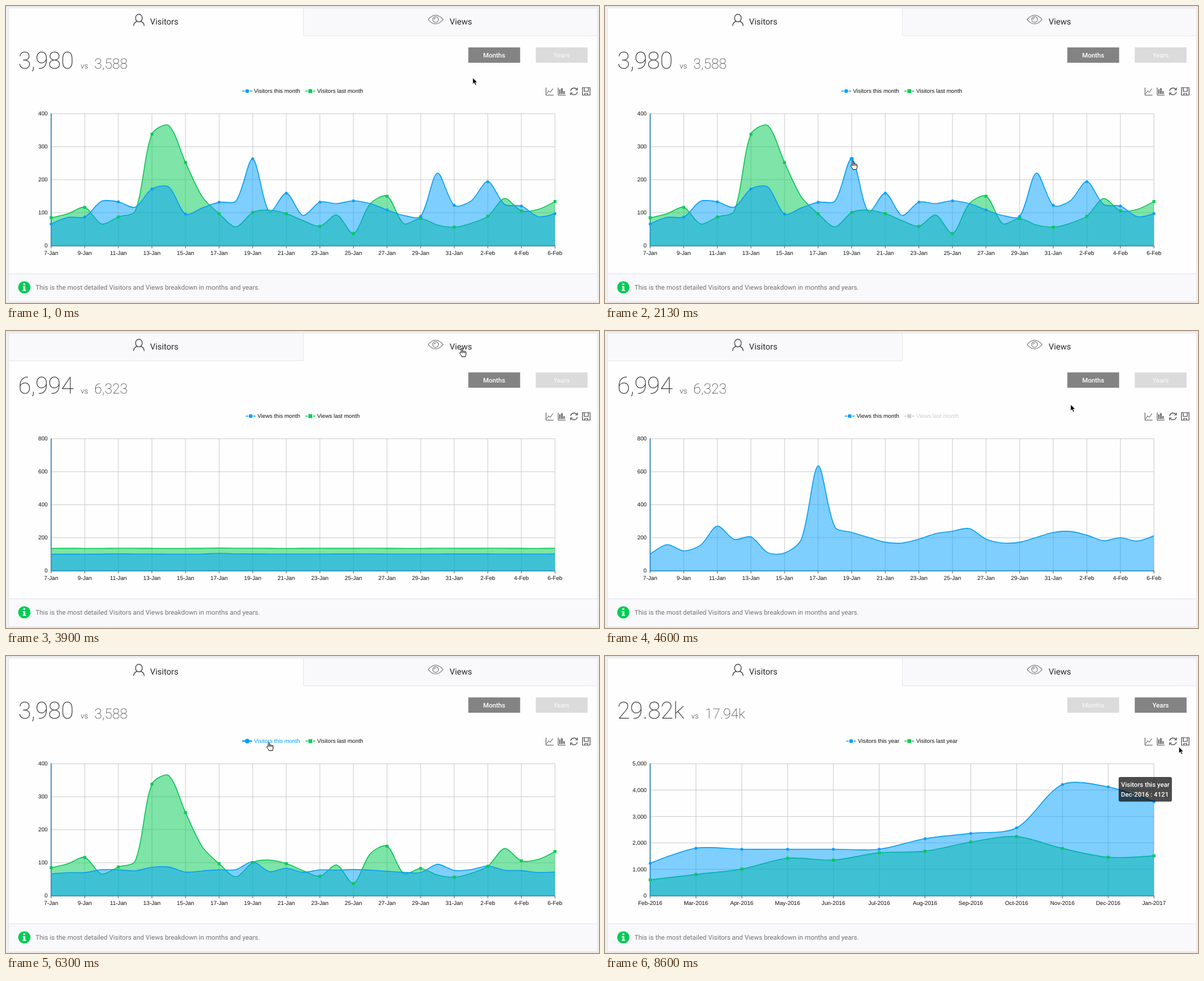
Recreate the animation shown at these times as an HTML page. Size 1024 px wide and 513 px high, loop 8630 ms.

```html
<!DOCTYPE html>
<html lang="en">
<head>
<meta charset="utf-8">
<title>Visitors and views</title>
<style>
html, body { margin: 0; width: 100%; height: 100%; overflow: hidden; background: #f1f1f4; }
svg { display: block; width: 1024px; height: 513px; }
text { font-family: Roboto, sans-serif; text-rendering: geometricPrecision; }
.chart text { font: 9.75px "Liberation Sans", Arial, sans-serif; fill: #111; }
.tab { font-size: 14.5px; fill: #2a2a2a; }
.big { font-size: 40.3px; font-weight: 100; fill: #222; }
.mid { font-size: 24.2px; font-weight: 100; fill: #222; }
.vs { font-size: 12.9px; font-weight: 300; fill: #444; }
.btn { font-size: 11.2px; font-weight: 500; text-anchor: middle; }
.note { font-size: 11.4px; fill: #747474; }
.tip { font-size: 11.2px; font-weight: 500; fill: #fff; }
.icon { fill: none; stroke: #4a4a4a; }
.end { text-anchor: end; }
.midl { text-anchor: middle; }
</style>
</head>
<body>
<svg viewBox="0 0 1024 513">
  <rect width="1024" height="1" fill="#dedee0"/>
  <rect y="512" width="1024" height="1" fill="#eee0d8"/>
  <rect x="4.5" y="3.5" width="1017" height="507" fill="#fefefe" stroke="#e6e6ea"/>
  <rect x="5" y="462" width="1016" height="48" fill="#f9f9fb"/>
  <path d="M5 462.5H1021" stroke="#dfe2ec"/>
  <g id="tabs"></g>
  <g class="icon" stroke-width="1.4">
    <ellipse cx="229.5" cy="20.8" rx="5.8" ry="6.6"/>
    <path d="M220.3 34.5c.2-4.6 2.2-6.6 5.8-8M238.7 34.5c-.2-4.6-2.2-6.6-5.8-8"/>
  </g>
  <g class="icon" stroke-width="1.2" style="stroke:#808080">
    <path d="M729 23.3Q741.8 8.5 754.8 23.3Q741.8 38.5 729 23.3Z"/>
    <circle cx="741.8" cy="23.3" r="5"/><path d="M739.5 23.3a2.4 2.4 0 0 1 2.4-2.4"/>
  </g>
  <text class="tab" x="248.7" y="32.4">Visitors</text>
  <text class="tab" x="766" y="32.4">Views</text>
  <g id="head"></g>
  <g class="icon">
    <path d="M932.5 141V154H945.5M934 151.5L937 146.5L940 149L944.5 142.5"/>
    <path d="M953.5 141V154H966.5"/>
    <path d="M956.5 144V152M960 142V152M963.5 147V152" stroke-width="2"/>
    <path d="M975 146.5A6 6 0 0 1 986 144.5M986.6 148.5A6 6 0 0 1 975.6 150.5" stroke-width="1.3"/>
    <path d="M986.8 141V145H983M974.8 154V150H978.6" stroke-width="1.2"/>
    <path d="M995.5 141V154H1008.5V141ZM998.5 141V147.5H1005.5V141M999.5 154V151H1004.5V154" stroke-width="1.2"/>
  </g>
  <circle cx="31.7" cy="486" r="10.6" fill="#0c5"/>
  <circle cx="31.7" cy="480.6" r="1.8" fill="#fff"/>
  <path d="M29 484H33.3V490.4H34.8V492H28.7V490.4H30.2V485.6H29Z" fill="#fff"/>
  <text class="note" x="51" y="490">This is the most detailed Visitors and Views breakdown in months and years.</text>
  <g class="chart">
    <g id="grid"></g><g id="series"></g><g id="legend"></g>
  </g>
  <g id="tip"></g>
  <g id="cursor">
    <path id="arrow" d="M0 0V11L2.5 8.7L4.3 13L6.3 12.1L4.5 8H8Z" fill="#000" stroke="#fff" stroke-width=".8"/>
    <path id="hand" d="M-1.2 7.5V1.2c0-1.5 2.2-1.5 2.2 0V5c.3-1 2-.9 2.2.2c.5-.8 2-.6 2.2.4c.6-.6 1.9-.3 1.9.8V10c0 2-1 2.4-1 4.4H0c-.4-2-2.4-3.8-3.4-5.7c-.8-1.4.9-2.3 2.2-1.2z M1 5V8M3.2 5.5V8M5.4 6V8" fill="#fff" stroke="#000" stroke-width="1"/>
  </g>
</svg>
<script>
const LOOP = 8630, GROW = 800, SMOOTH = .3;
const L = 78, R = 948, T = 186, B = 414;
const COLORS = ['#00a0ff', '#00cc52'], LINES = ['#0a9ef0', '#0bc455'], OFF = '#ccc';
const $ = id => document.getElementById(id);

// A rule for ordinary days, with runs of special values laid over it
function series(n, rule, runs) {
  const list = Array.from({length: n}, (_, i) => rule(i));
  for (const from in runs) runs[from].forEach((v, i) => list[+from + i] = v);
  return list;
}
const wave = (mid, amp, peak, period) => i => mid + amp * Math.cos((i - peak) / period * 2 * Math.PI);

const visitors = [
  series(31, wave(112, 24, 10.7, 7.3), {0: [66, 86, 87], 6: [172, 178], 12: [263], 14: [159], 16: [132], 23: [220], 26: [194, 125, 120]}),
  series(31, wave(82, 26, 12.9, 7.3), {1: [97, 116], 6: [338, 364, 252, 148, 97, 57], 17: [93, 37, 127, 150, 67], 27: [143], 29: [110, 134]})
];
const viewsNow = series(31, wave(222, 44, 18, 6.7), {0: [100, 169, 124, 165, 302, 207, 225, 112, 108, 207, 737, 296], 19: [285], 28: [219]});
const views = [viewsNow, viewsNow.map((v, i) => v * .55 + 80 + 35 * Math.sin(i * 1.7))];
const yearly = [
  series(12, () => 1760, {0: [1230, 1800], 6: [2160, 2360, 2570, 4210, 4121, 3560]}),
  series(12, i => 600 + 205 * i, {3: [1420, 1350], 6: [1685], 9: [1790, 1455, 1510]})
];
const days = Array.from({length: 16}, (_, i) => i < 13 ? `${7 + 2 * i}-Jan` : `${2 * i - 24}-Feb`);
const months = 'Feb Mar Apr May Jun Jul Aug Sep Oct Nov Dec Jan'.split(' ').map((m, i) => `${m}-${i < 11 ? 2016 : 2017}`);

const modes = {
  visitors: {data: visitors, max: 400, step: 100, labels: days, every: 2, name: 'Visitors', unit: 'month', legX: 408, nums: ['3,980', '3,588'], vsX: 129},
  views: {data: views, max: 800, step: 200, labels: days, every: 2, name: 'Views', unit: 'month', legX: 414, nums: ['6,994', '6,323'], vsX: 129},
  years: {data: yearly, max: 5000, step: 1000, labels: months, every: 1, name: 'Visitors', unit: 'year', legX: 416.5, nums: ['29.82k', '17.94k'], vsX: 149}
};

const hot = (x, y, tip) => ({x, y, hand: true, tip});
const places = {
  start: {x: 806, y: 124}, pause: {x: 804, y: 127}, exit: {x: 991, y: 157},
  visitorsTab: hot(270, 28), viewsTab: hot(787, 30), years: hot(958, 88),
  first: hot(454, 149), second: hot(578, 147), line: hot(938, 150), bar: hot(958, 153),
  peak: hot(428, 268, ['Visitors this month', `19-Jan : ${visitors[0][12]}`]),
  dec: hot(868, 229, ['Visitors this year', `Dec-2016 : ${yearly[0][10]}`])
};

// time, cursor place, change made there, series that start growing
const steps = [
  [0, 'start', {mode: 'visitors', bar: false, on: [1, 1]}],
  [1060, 'peak'],
  [2695, 'first', {on: [0, 1]}, [1]],
  [3000, 'second'],
  [3450, 'first', {on: [1, 1]}, [0]],
  [3900, 'viewsTab', {mode: 'views'}, [0, 1]],
  [4389, 'second', {on: [1, 0]}, [0]],
  [4600, 'pause'],
  [4900, 'visitorsTab', {mode: 'visitors', on: [1, 1]}, [0, 1]],
  [5350, 'first', {on: [0, 1]}, [1]],
  [6277, 'first', {on: [1, 1]}, [0]],
  [6650, 'years', {mode: 'years'}, [0, 1]],
  [7004, 'bar', {bar: true}, [0, 1]],
  [7400, 'line', {bar: false}, [0, 1]],
  [8230, 'dec'],
  [8590, 'exit']
];

function stateAt(t) {
  const s = {born: [-GROW, -GROW]};
  for (const [at, , change, grow = []] of steps) {
    if (at > t) break;
    Object.assign(s, change);
    grow.forEach(i => s.born[i] = at);
  }
  return s;
}

// The cursor rests at a place, then leaves in time to reach the next one
function cursorAt(t) {
  let i = 0;
  while (i < steps.length - 2 && steps[i + 1][0] <= t) i++;
  const a = places[steps[i][1]], b = places[steps[i + 1][1]];
  const dx = b.x - a.x, dy = b.y - a.y, arrive = steps[i + 1][0] - 70;
  const leave = Math.max(steps[i][0] + 50, arrive - 150 - 1.6 * Math.hypot(dx, dy));
  const u = Math.min(1, Math.max(0, (t - leave) / (arrive - leave))), e = u * u * (3 - 2 * u);
  const x = a.x + dx * e, y = a.y + dy * e;
  const hand = Object.values(places).some(p => p.hand && Math.hypot(p.x - x, p.y - y) < 14);
  return {x, y, hand};
}

function growth(age) {
  const u = age / GROW;
  return u >= 1 ? 1 : 1 - 2 ** (-10 * u);
}

const yOf = (v, max) => B - v / max * (B - T);
const rect = (x, y, w, h, fill, extra = '') => `<rect x="${x}" y="${y}" width="${w}" height="${h}" fill="${fill}" ${extra}/>`;
const label = (cls, x, y, s, extra = '') => `<text class="${cls}" x="${x}" y="${y}" ${extra}>${s}</text>`;

// Bezier through the points, handles weighted by the neighbours' distance
function smooth(p) {
  const n = p.length - 1;
  const handles = p.map((c, i) => {
    if (i === 0 || i === n) return [c, c];
    const a = p[i - 1], b = p[i + 1];
    const da = Math.hypot(c[0] - a[0], c[1] - a[1]), db = Math.hypot(b[0] - c[0], b[1] - c[1]);
    const vx = (b[0] - a[0]) * SMOOTH, vy = (b[1] - a[1]) * SMOOTH, f = da / (da + db);
    return [[c[0] - vx * f, c[1] - vy * f], [c[0] + vx * (1 - f), c[1] + vy * (1 - f)]];
  });
  let d = 'M' + p[0];
  for (let i = 1; i <= n; i++) d += `C${handles[i - 1][1]} ${handles[i][0]} ${p[i]}`;
  return d;
}

function drawTabs(m) {
  const x = m.name === 'Views' ? 5 : 514;
  return rect(x, 4, x === 5 ? 508 : 507, 47, '#f9f9fb') +
    `<path d="M513.5 4V51M${x} 51.5H${x === 5 ? 514 : 1021}" stroke="#e6e6ec" fill="none"/>`;
}

function drawHead(m) {
  const button = (x, s, on) => rect(x, 71.5, 89.5, 26.5, on ? '#838383' : '#dbdbdb') +
    label('btn', x + 44.7, 88.8, s, `fill="${on ? '#fff' : '#f4f4f4'}"`);
  const year = m.unit === 'year';
  return label('big', 21.2, 107.8, m.nums[0]) + label('vs', m.vsX, 107.8, 'vs') +
    label('mid', m.vsX + 23.4, 107.8, m.nums[1]) +
    button(798.3, 'Months', !year) + button(914.8, 'Years', year);
}

function drawGrid(m, bar) {
  const n = m.labels.length, band = (R - L) / (bar ? n : n - 1);
  let lines = '', ticks = '', out = '';
  for (let v = 0; v <= m.max; v += m.step) {
    const y = yOf(v, m.max);
    if (v) lines += `M${L} ${y}H${R}`;
    out += label('end', 72, y + 3.3, v.toLocaleString('en-US'));
  }
  for (let i = 0; i < n + (bar ? 1 : 0); i++) {
    const x = L + band * i;
    lines += `M${x} ${T}V${B}`;
    ticks += `M${x} ${B}V418.5`;
  }
  m.labels.forEach((s, i) => out += label('midl', L + band * (i + (bar ? .5 : 0)), 429.5, s));
  return `<path d="${lines}" stroke="#c9c9c9"/><path d="${ticks}" stroke="#444"/>` +
    `<path d="M${L} 185.5V415M${L - 1} 414.3H${R}" stroke="#48b" stroke-width="1.8" fill="none"/>` + out;
}

function drawBars(m, s, t) {
  const band = (R - L) / 12;
  return m.data.map((list, j) => list.map((v, i) => {
    const y = yOf(v * growth(t - s.born[j]), m.max);
    return rect(L + band * i + 7.2 + 32.7 * j, y, 25.8, B - y - .5, COLORS[j]);
  }).join('')).join('');
}

function drawLines(m, s, t, cur) {
  let out = '', marks = '';
  for (const j of [1, 0]) {
    if (!s.on[j]) continue;
    const list = m.data[j], age = t - s.born[j], k = growth(age);
    const pts = list.map((v, i) => [L + (R - L) * i / (list.length - 1), yOf(list[0] + (v - list[0]) * k, m.max)]);
    const d = smooth(pts);
    out += `<path d="${d}V${B}H${L}Z" fill="${COLORS[j]}" opacity=".5"/>` +
      `<path d="${d}" fill="none" stroke="${LINES[j]}" stroke-width="1.6"/>`;
    if (age < GROW) continue;
    pts.forEach(([x, y], i) => {
      if (i % m.every) return;
      const r = Math.hypot(cur.x - x, cur.y - y) < 8 ? 3.4 : 2.5;
      marks += j ? rect(x - r, y - r, 2 * r, 2 * r, COLORS[1]) :
        `<circle cx="${x}" cy="${y}" r="${r}" fill="${COLORS[0]}"/>`;
    });
  }
  return out + marks;
}

function drawLegend(m, s, cur) {
  return ['this', 'last'].map((word, j) => {
    const x = j ? 517 : m.legX, end = j ? 616 : 509;
    const over = s.on[j] && cur.y > 141 && cur.y < 154 && cur.x > x && cur.x < end;
    const c = s.on[j] ? COLORS[j] : OFF, r = over ? 4 : 3.3, cx = x + 8.5;
    const sign = j ? rect(cx - r, 147 - r, 2 * r, 2 * r, c) : `<circle cx="${cx}" cy="147" r="${r}" fill="${c}"/>`;
    const icon = s.bar ? rect(x, 142, 16.5, 9.6, c, 'rx="1.5"') :
      `<path d="M${x} 147h${over ? 17 : 4}M${x + 13} 147h4" stroke="${c}" stroke-width="${over ? 2.4 : 1.6}"/>` + sign;
    const ink = over ? c : s.on[j] ? '#111' : OFF;
    return icon + label('', x + 20.3, 150.3, `${m.name} ${word} ${m.unit}`, `style="fill:${ink}"`);
  }).join('') + drawHint(cur);
}

function drawHint(cur) {
  const name = ['line', 'bar'].find(p => Math.hypot(cur.x - places[p].x, cur.y - places[p].y) < 8);
  return name ? label('midl', places[name].x + 1.5, 171, name) : '';
}

const pen = document.createElement('canvas').getContext('2d');
function drawTip(t) {
  const step = steps.find(([at, p]) => places[p].tip && t > at + 30 && t < at + 830);
  if (!step) return '';
  const {x, y, tip} = places[step[1]];
  pen.font = '500 11.2px Roboto, sans-serif';
  const w = pen.measureText(tip[0]).width + 8, left = x + 19, top = y - 20;
  return rect(left, top, w, 42.5, '#000', 'rx="3" opacity=".7"') +
    tip.map((s, i) => label('tip', left + 4, top + 17 + 17 * i, s)).join('');
}

const shown = {};
function put(id, html) {
  if (shown[id] !== html) $(id).innerHTML = shown[id] = html;
}

function render(t) {
  const s = stateAt(t), m = modes[s.mode], cur = cursorAt(t);
  put('tabs', drawTabs(m));
  put('head', drawHead(m));
  put('grid', drawGrid(m, s.bar));
  put('series', s.bar ? drawBars(m, s, t) : drawLines(m, s, t, cur));
  put('legend', drawLegend(m, s, cur));
  put('tip', drawTip(t));
  $('cursor').setAttribute('transform', `translate(${cur.x} ${cur.y})`);
  $('arrow').style.display = cur.hand ? 'none' : '';
  $('hand').style.display = cur.hand ? '' : 'none';
}

const start = performance.now();
function tick() {
  render((performance.now() - start) % LOOP);
  requestAnimationFrame(tick);
}
tick();
</script>
</body>
</html>
```
